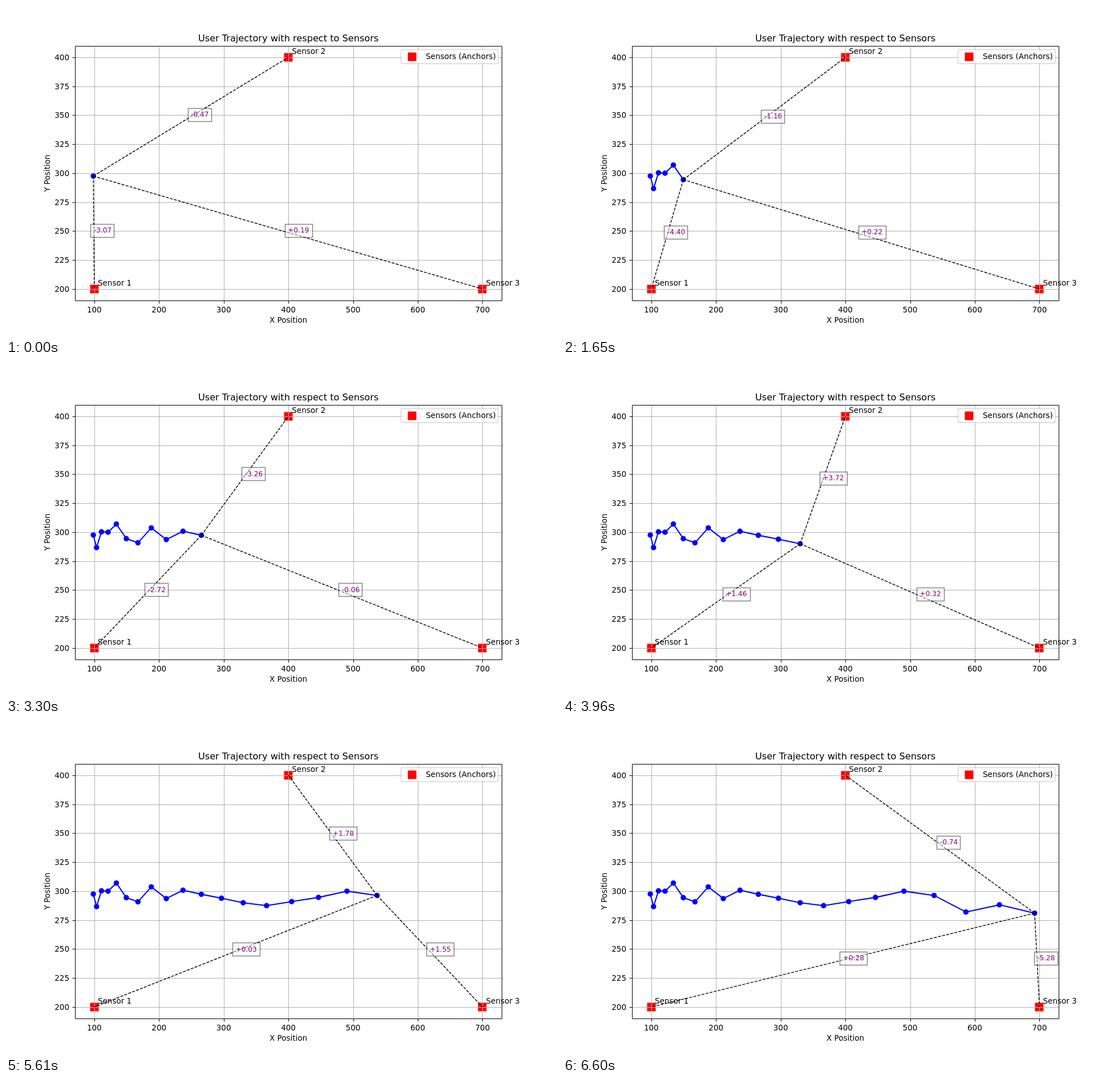
Animation of 966 by 580 pixels, one loop 6930 ms. Source, as an HTML page:

```html
<!DOCTYPE html>
<html lang="en">
<head>
<meta charset="utf-8">
<title>User Trajectory</title>
<style>
  html, body { margin: 0; width: 100%; height: 100%; overflow: hidden; background: #fff; }
  svg { display: block; font-family: "DejaVu Sans", Verdana, sans-serif; font-size: 13.5px; }
</style>
</head>
<body>
<svg id="stage" width="966" height="580" viewBox="0 0 966 580"></svg>
<script>
const STEP_MS = 330;
const SCALE_X = 1.1343, SCALE_Y = 2.03;
const toX = v => 154.78 + (v - 100) * SCALE_X;
const toY = v => 495.9 - (v - 200) * SCALE_Y;
const snap = v => Math.round(v) + 0.5;
const AXES = { left: 121.5, right: 869.5, top: 70.5, bottom: 516.5 };
const CENTER_X = 495.1;

const sensors = [[100, 200], [400, 400], [700, 200]].map(([x, y]) => ({ x: toX(x), y: toY(y) }));

// The user speeds up steadily to the right while the height wanders.
const heights = [297.5, 286.7, 300.3, 300, 307, 294.4, 290.8, 303.7, 293.6, 300.8, 297.3,
  293.9, 290, 287.5, 291, 294.6, 300, 296.3, 282, 288.2, 281];
const track = heights.map((h, i) => ({ x: toX(98.5 + 3.7 * i + 1.3 * i * i), y: toY(h) }));

// Readings swing from step to step, fade with distance and change sign far away.
const swing = step => 6 * Math.cos((67.4 * step - 122.6) * Math.PI / 180);
const fade = d => 2 * (Math.exp(-d / 150) - Math.exp(-460 / 150));
const reading = (step, user, sensor) =>
  swing(step) * fade(Math.hypot((user.x - sensor.x) / SCALE_X, (user.y - sensor.y) / SCALE_Y));

function add(parent, tag, attrs, text) {
  const node = document.createElementNS("http://www.w3.org/2000/svg", tag);
  set(node, attrs);
  if (text !== undefined) node.textContent = text;
  return parent.appendChild(node);
}
function set(node, attrs) {
  for (const key in attrs) node.setAttribute(key, attrs[key]);
}

const stage = document.getElementById("stage");
const middle = { "text-anchor": "middle" };
const label = (x, y, text, attrs) => add(stage, "text", { x, y, ...attrs }, text);
const square = (x, y) => add(stage, "rect", {
  x: Math.round(x) - 7.5, y: Math.round(y) - 7.5, width: 15, height: 15, fill: "#f00"
});

function drawAxes() {
  const { left, right, top, bottom } = AXES;
  let grid = "", ticks = "";
  for (let v = 100; v <= 700; v += 100) {
    const x = snap(toX(v));
    grid += `M${x} ${top}V${bottom}`;
    ticks += `M${x} ${bottom}v5`;
    label(toX(v), 537, v, middle);
  }
  for (let v = 200; v <= 400; v += 25) {
    const y = snap(toY(v));
    grid += `M${left} ${y}H${right}`;
    ticks += `M${left} ${y}h-5`;
    label(111, Math.round(toY(v) + 5), v, { "text-anchor": "end" });
  }
  sensors.forEach(s => square(s.x, s.y));
  add(stage, "path", { d: grid, stroke: "#b0b0b0" });
  const frame = `M${left} ${top}H${right}V${bottom}H${left}Z`;
  add(stage, "path", { d: frame + ticks, fill: "none", stroke: "#000" });
  label(CENTER_X, 62, "User Trajectory with respect to Sensors", { ...middle, "font-size": 16.15 });
  label(CENTER_X, 555, "X Position", middle);
  label(0, 0, "Y Position", { ...middle, transform: "translate(76.5 293) rotate(-90)" });
}

function drawLegend() {
  add(stage, "rect", {
    x: 692.5, y: 76.5, width: 170.5, height: 24.5, rx: 2.8,
    fill: "#fff", stroke: "#ccc", "stroke-width": 1.39, opacity: 0.8
  });
  square(712, 89);
  label(736, 93, "Sensors (Anchors)");
}

drawAxes();
const line = add(stage, "path", {
  fill: "none", stroke: "#00f", "stroke-width": 2.08, "stroke-linejoin": "round"
});
const dots = add(stage, "path", { stroke: "#00f", "stroke-width": 9.5, "stroke-linecap": "round" });
const rays = sensors.map(() => add(stage, "path", {
  stroke: "#000", "stroke-width": 1.39, "stroke-dasharray": "5.139 2.222"
}));
sensors.forEach((s, i) => label(s.x + 6.2, s.y - 6.1, `Sensor ${i + 1}`));
const tags = sensors.map(() => ({
  box: add(stage, "rect", {
    height: 23, fill: "#fff", stroke: "#000", "stroke-width": 1.39, opacity: 0.5
  }),
  text: label(0, 0, "", { fill: "#800080", "font-size": 12.1 })
}));
drawLegend();

function showStep(step) {
  const user = track[step];
  const path = track.slice(0, step + 1);
  set(line, { d: "M" + path.map(p => `${p.x} ${p.y}`).join("L") });
  set(dots, { d: path.map(p => `M${p.x} ${p.y}h0.01`).join("") });
  sensors.forEach((s, i) => {
    set(rays[i], { d: `M${user.x} ${user.y}L${s.x} ${s.y}` });
    const value = reading(step, user, s);
    const x = (user.x + s.x) / 2, y = (user.y + s.y) / 2;
    const { box, text } = tags[i];
    set(box, { x: snap(x - 5.56), y: snap(y - 15), width: value < 0 ? 41 : 48 });
    set(text, { x, y: Math.round(y + 0.4) });
    text.textContent = (value < 0 ? "" : "+") + value.toFixed(2);
  });
}

let shown = -1;
const start = performance.now();
function tick() {
  const step = Math.floor((performance.now() - start) / STEP_MS) % track.length;
  if (step !== shown) showStep(shown = step);
  requestAnimationFrame(tick);
}
tick();
</script>
</body>
</html>
```
